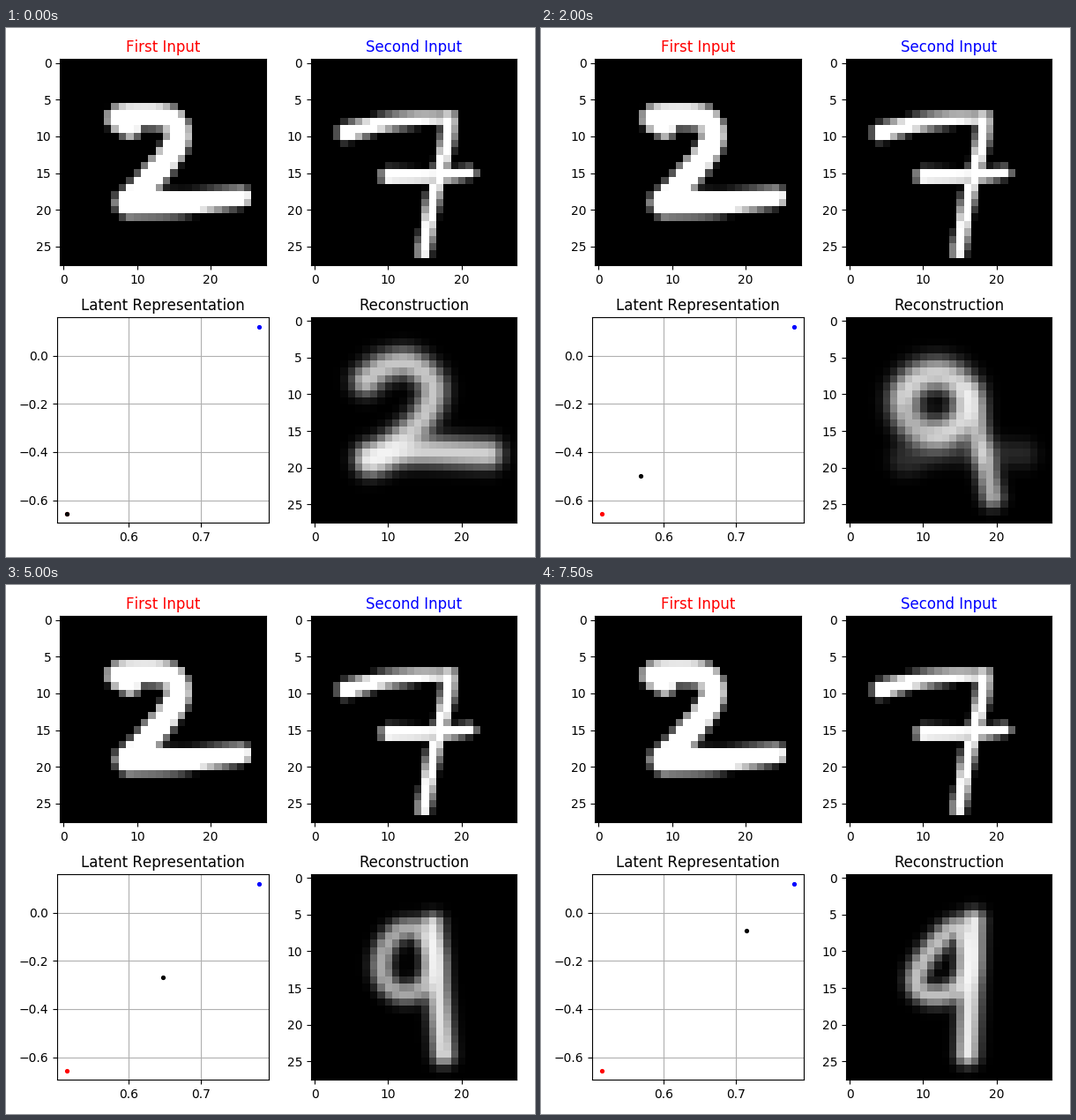
A matplotlib script for the animation above (8 s loop, 600 by 600 pixels).

```python
import numpy as np
import matplotlib.pyplot as plt
from matplotlib.animation import FuncAnimation

plt.rcParams["text.kerning_factor"] = 6

N = 28
FRAMES = 16
STEPS = 20          # steps for the full walk from red to blue
SIZE = 600
SIDE = 233.4
START = np.array([0.5149, -0.6553])
END = np.array([0.7805, 0.1219])

ROWS, COLS = np.mgrid[:N, :N]


def spline(*points, n=40):
    """Catmull-Rom curve through the points."""
    p = np.array(points, float)
    p = np.vstack([2 * p[0] - p[1], p, 2 * p[-1] - p[-2]])
    t = np.linspace(0, 1, n)[:, None]
    parts = [b + 0.5 * t * (c - a + t * (2 * a - 5 * b + 4 * c - d
                                         + t * (3 * (b - c) + d - a)))
             for a, b, c, d in zip(p, p[1:], p[2:], p[3:])]
    return np.vstack(parts)


def distance(curve):
    x, y = curve.T[:, :, None, None]
    return np.hypot(COLS - x, ROWS - y)


def pen(curve, r0, r1):
    """Hard stroke whose radius goes from r0 to r1."""
    r = np.linspace(r0, r1, len(curve))[:, None, None]
    return np.clip(r + 0.5 - distance(curve), 0, 1).max(axis=0)


def brush(curve, width, light):
    """Blurred stroke."""
    return light * np.exp(-(distance(curve).min(axis=0) / width) ** 2.2)


def screen(a, b):
    return 1 - (1 - a) * (1 - b)


def first_input():
    neck = spline((9, 8.7), (7.4, 7.5), (10, 7.2), (14.6, 7.7),
                  (15.4, 10.8), (12, 15.6), (9, 18.9))
    foot = spline((9, 19), (16, 19.1), (24.2, 18.3))
    return np.maximum(pen(neck, 1.5, 1.8), pen(foot, 2.0, 1.3))


def second_input():
    bar = spline((4.3, 9.5), (9, 8.3), (14, 7.7), (18.2, 7.6))
    stem = spline((18.3, 7.6), (17.9, 11), (16.2, 18), (14.8, 25.6))
    cross = spline((10, 15.4), (17, 15.4), (21.2, 14.9))
    return np.max([pen(bar, 1.2, 0.7), pen(stem, 0.95, 0.9),
                   pen(cross, 1.05, 0.7)], axis=0)


def soft_two(i):
    neck = spline((7, 8.2), (9.5, 6.4), (13, 6), (16, 9),
                  (14.5, 13.5), (9.5, 18), (7.5, 19))
    foot = spline((8, 18.7), (13, 17.8), (23.5, 18.2))
    neck[:, 1] += i / 24 * (19 - neck[:, 1])    # the top sinks
    return screen(brush(neck, 2.0, 0.78), brush(foot, 2.0, 0.82))


def soft_nine(i):
    """A ring and a stem that drift from a round 9 towards a 4."""
    def at(*values):
        return np.interp(i, (4, 6, 10, 15), values)

    t = np.linspace(0, 2 * np.pi, 200)
    dy = at(4.1, 4.1, 4.4, 4.6) * np.sin(t)
    lean = at(0, 0, 0.1, 0.6) * (1 - np.cos(t)) / 2
    x = at(11.7, 12, 12.6, 13) + at(4.3, 4.2, 3.5, 3.1) * np.cos(t) - lean * dy
    ring = np.column_stack([x, at(11.3, 11, 11.4, 11.5) + dy])
    stem = spline((at(16.3, 16.2, 16, 16.8), at(10, 9, 6.5, 6)),
                  (at(19.4, 18.7, 17.5, 16), 24), n=100)
    return screen(brush(ring, at(2.2, 1.7, 1.5, 1.5), at(0.85, 0.8, 0.66, 0.75)),
                  brush(stem, 1.55, at(0.82, 0.85, 0.88, 0.92)))


def decode(i):
    u = min(i / 5.5, 1)
    w = u * u * (3 - 2 * u)
    return (1 - w) * soft_two(i) + w * soft_nine(i)


fig = plt.figure(figsize=(6, 6), dpi=100, facecolor="white")


def panel(left, top, width, title, color="black"):
    ax = fig.add_axes([left / SIZE, 1 - (top + SIDE) / SIZE,
                       width / SIZE, SIDE / SIZE])
    ax.set_title(title, color=color)
    return ax


def picture(left, top, title, data, color="black"):
    ax = panel(left, top, SIDE, title, color)
    im = ax.imshow(data, cmap="gray", vmin=0, vmax=1, interpolation="nearest")
    ax.set_xticks(range(0, N, 10))
    ax.set_yticks(range(0, N, 5))
    return im


picture(61.25, 35.4, "First Input", first_input(), "red")
picture(345.9, 35.4, "Second Input", second_input(), "blue")
recon = picture(345.9, 327.9, "Reconstruction", decode(0))

latent = panel(58.2, 327.9, 239.8, "Latent Representation")
latent.grid(True)
latent.set_axisbelow(True)
for spot, style in ((START, "r."), (END, "b.")):
    latent.plot(*spot, style, markersize=5.5)
walker, = latent.plot(*START, "k.", markersize=5.5)
span = END - START
low, high = START - 0.05 * span, END + 0.05 * span
latent.set_xlim(low[0], high[0])
latent.set_ylim(low[1], high[1])
latent.set_xticks([0.6, 0.7])
latent.set_yticks([-0.6, -0.4, -0.2, 0.0])


def update(i):
    x, y = START + span * i / STEPS
    walker.set_data([x], [y])
    recon.set_data(decode(i))
    return walker, recon


anim = FuncAnimation(fig, update, frames=FRAMES, interval=500,
                     repeat=True, repeat_delay=0, blit=False)
plt.show()
```
